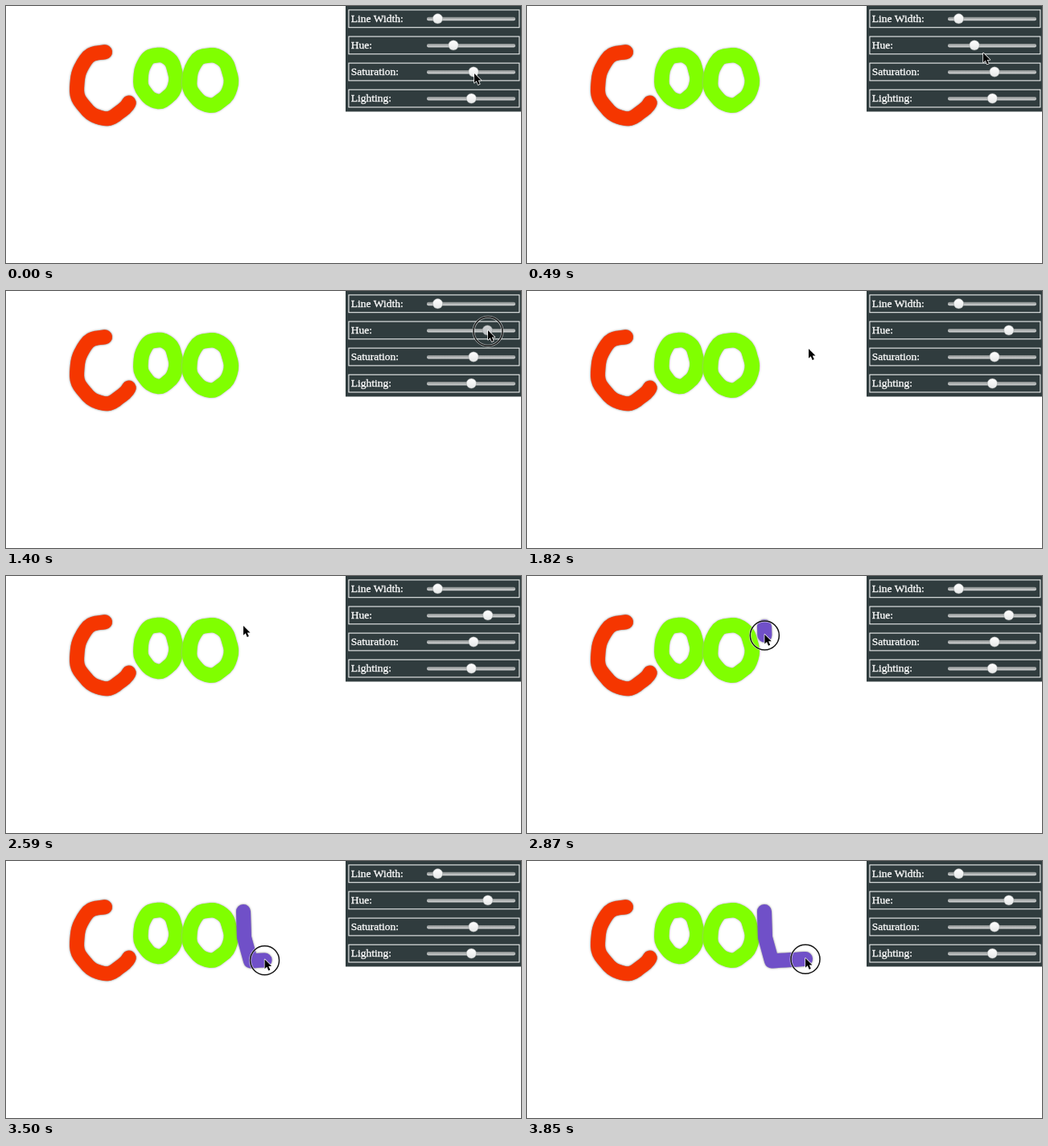
Recreate the animation shown at these times as an HTML page with a canvas. Size 640 by 320 pixels, loop 3.92 s.

```html
<!DOCTYPE html>
<html lang="en">
<head>
<meta charset="utf-8">
<title>Paint sliders</title>
<style>
html, body { margin: 0; width: 100%; height: 100%; overflow: hidden; background: #fff; }
canvas { display: block; width: 640px; height: 320px; }
</style>
</head>
<body>
<canvas id="stage" width="640" height="320"></canvas>
<script>
const ctx = document.getElementById('stage').getContext('2d');
const LOOP = 3920, STEP = 70, TAU = Math.PI * 2;
const DRAG = { from: 840, to: 1470 }, DRAW_FROM = 2730;

const linear = k => k;
const smooth = k => k * k * (3 - 2 * k);
const easeOut = k => 1 - (1 - k) ** 1.6;

// Cursor stops, each with the easing used to reach it
const stops = [
  { t: 0, x: 582, y: 84 },
  { t: 840, x: 558, y: 43, ease: smooth },
  { t: 910, x: 558, y: 43, ease: linear },
  { t: 1400, x: 599, y: 49, ease: linear },
  { t: 1540, x: 600, y: 49, ease: linear },
  { t: 1820, x: 350, y: 72, ease: easeOut },
  { t: 2590, x: 295, y: 62, ease: easeOut },
  { t: 2800, x: 295, y: 62, ease: linear },
  { t: 3010, x: 296, y: 94, ease: linear },
  { t: 3220, x: 304, y: 123.5, ease: linear },
  { t: 3850, x: 346, y: 121, ease: smooth }
];

function cursorAt(t) {
  const i = Math.max(1, stops.findIndex(s => s.t >= t));
  const a = stops[i - 1], b = stops[i];
  const k = b.ease((t - a.t) / (b.t - a.t));
  return { x: a.x + (b.x - a.x) * k, y: a.y + (b.y - a.y) * k };
}

// Elliptical arc with a slight hand-drawn wobble
function handArc(cx, cy, rx, ry, from = 0, sweep = TAU) {
  return Array.from({ length: 41 }, (_, i) => {
    const a = from + sweep * i / 40;
    const r = 1 + 0.018 * Math.sin(5 * a) + 0.01 * Math.cos(9 * a);
    return { x: cx + rx * r * Math.cos(a), y: cy + ry * r * Math.sin(a) };
  });
}

const letterC = handArc(123, 98, 35, 41.5, -Math.PI / 2, 0.57 - 1.5 * Math.PI);
const firstO = handArc(189.3, 89.5, 22, 29);
const secondO = handArc(253.8, 92, 25.8, 31.2);

function brush(points, color, edge, width = 18) {
  ctx.save();
  ctx.beginPath();
  points.forEach(p => ctx.lineTo(p.x, p.y));
  ctx.lineCap = ctx.lineJoin = 'round';
  ctx.lineWidth = width;
  ctx.strokeStyle = color;
  ctx.shadowColor = edge;
  ctx.shadowBlur = 2.5;
  ctx.stroke();
  ctx.restore();
}

function circle(x, y, r) {
  ctx.beginPath();
  ctx.arc(x, y, r, 0, TAU);
}

function verticalFade(y, half, top, bottom) {
  const fade = ctx.createLinearGradient(0, y - half, 0, y + half);
  fade.addColorStop(0, top);
  fade.addColorStop(1, bottom);
  return fade;
}

function slider(label, row, thumb, active) {
  const top = 5 + row * 33.1, y = top + 10.8;
  ctx.strokeStyle = '#eef0f0';
  ctx.lineWidth = 1.1;
  ctx.strokeRect(425.9, top - 0.1, 212, 21.8);

  ctx.fillStyle = ctx.strokeStyle = '#fff';
  ctx.font = '13.5px "Liberation Serif", Times, serif';
  ctx.fillText(label, 428.7, top + 15);
  ctx.lineWidth = 0.3;
  ctx.strokeText(label, 428.7, top + 15);

  ctx.fillStyle = verticalFade(y, 2.2, '#858a8a', '#d2d4d4');
  ctx.beginPath();
  ctx.roundRect(523, y - 2, 110, 4.5, 2);
  ctx.fill();

  ctx.fillStyle = active
    ? verticalFade(y, 6, '#d0d2d4', '#b9bdc0')
    : verticalFade(y, 6, '#fff', '#e6e8e8');
  circle(thumb, y, 6.2);
  ctx.fill();
  ctx.strokeStyle = '#8d9293';
  ctx.lineWidth = 0.5;
  ctx.stroke();
}

function ring(x, y) {
  circle(x, y, 18);
  ctx.strokeStyle = 'rgba(255,255,255,.6)';
  ctx.lineWidth = 3;
  ctx.stroke();
  ctx.strokeStyle = '#151515';
  ctx.lineWidth = 1.5;
  ctx.stroke();
}

const arrow = new Path2D('M0 0V11.8L2.7 9.3 4.7 14 6.8 13.1 4.8 8.6 8.5 8.5Z');

function pointer(x, y) {
  ctx.save();
  ctx.translate(x, y);
  ctx.lineJoin = 'round';
  ctx.lineWidth = 1.4;
  ctx.strokeStyle = '#fff';
  ctx.stroke(arrow);
  ctx.fillStyle = '#000';
  ctx.fill(arrow);
  ctx.restore();
}

function drawnStroke(t) {
  const points = [];
  for (let s = DRAW_FROM; s <= t; s += STEP) {
    const p = cursorAt(s);
    points.push({ x: p.x, y: p.y + 1 });
  }
  return [points[0], ...points];
}

function render(t) {
  const { x, y } = cursorAt(t);
  const dragging = t >= DRAG.from && t <= DRAG.to;
  const drawing = t >= DRAW_FROM;

  ctx.fillStyle = '#fff';
  ctx.fillRect(0, 0, 640, 320);

  brush(letterC, '#f53600', '#666');
  brush(firstO, '#80ff00', '#a9a0b4', 18.5);
  brush(secondO, '#80ff00', '#a9a0b4', 18.5);
  if (drawing) brush(drawnStroke(t), '#7050c8', '#777');

  ctx.fillStyle = '#303c3e';
  ctx.fillRect(422, 0, 218, 131.5);
  const hue = t < DRAG.from ? 556 : cursorAt(Math.min(t, DRAG.to)).x - 0.7;
  slider('Line Width:', 0, 536.5);
  slider('Hue:', 1, hue, dragging);
  slider('Saturation:', 2, 581);
  slider('Lighting:', 3, 578.3);

  if (dragging || drawing) ring(x, y + 1.3);
  pointer(x, y);
}

const start = performance.now();
function frame() {
  const elapsed = (performance.now() - start) % LOOP;
  render(Math.floor(elapsed / STEP) * STEP);
  requestAnimationFrame(frame);
}
frame();
</script>
</body>
</html>
```
